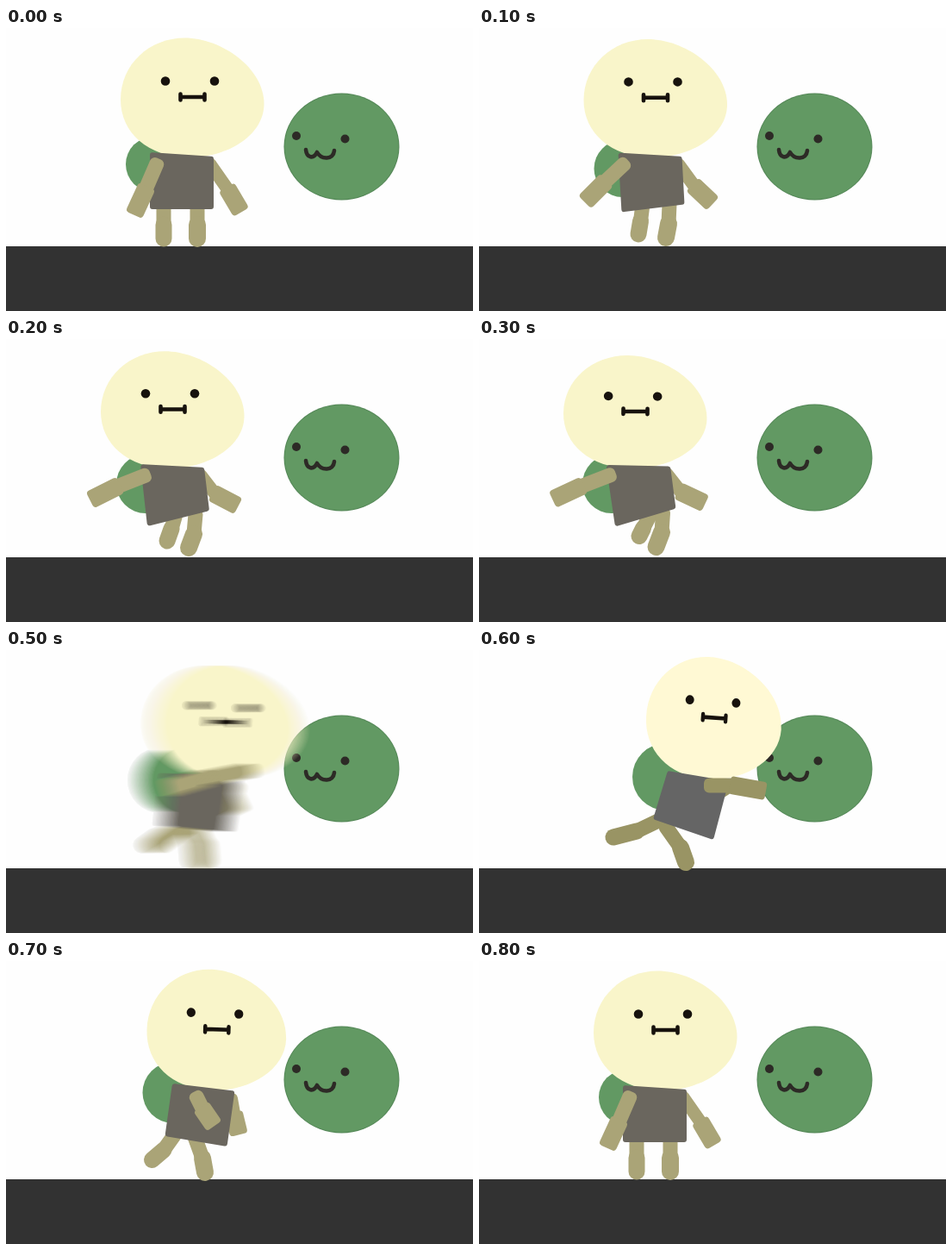
An HTML page with a canvas for the animation above (1.1 s loop, 542 px wide and 328 px high).

```html
<!DOCTYPE html>
<html>
<head>
<meta charset="utf-8">
<style>
html, body { margin: 0; width: 100%; height: 100%; overflow: hidden; background: #fefefe; }
canvas { display: block; }
</style>
</head>
<body>
<canvas id="stage" width="542" height="328"></canvas>
<script>
const W = 542, H = 328;
const screen = document.getElementById('stage').getContext('2d');
const layer = document.createElement('canvas');
layer.width = W;
layer.height = H;
const ctx = layer.getContext('2d');

const SOFT = { skin: '#f9f5ca', cloth: '#6a665e', limb: '#aaa477' };
const VIVID = { skin: '#fff9d4', cloth: '#656565', limb: '#999464' };
const GREEN = '#629963', INK = '#2d2a26';

// head: x, height scale, width scale, tilt; tail: x, y, radius;
// body: four corners; limbs: joints from the trunk outwards
const stand = {
  head: [216.5, 1, 1, 0], tail: [171, 158, 32],
  body: [167, 144, 241, 149, 241, 210, 167, 210],
  front: [175, 157, 162, 187, 150, 213], back: [258, 188, 271, 210],
  legL: [183, 205, 183, 228, 183, 244], legR: [222, 205, 222, 228, 222, 244]
};
const lean = {
  head: [193.5, .98, 1, 0], tail: [162, 168, 34],
  body: [156, 145, 230, 149, 236, 199, 164, 217],
  front: [162, 158, 129, 171, 101, 185], back: [243, 180, 266, 192],
  legL: [197, 203, 192, 220, 187, 234], legR: [220, 203, 218, 226, 212, 242]
};
const windUp = {
  head: [169.5, .91, 1, 1], tail: [146, 168, 34],
  body: [139, 147, 214, 146, 221, 194, 152, 218],
  front: [144, 157, 107, 171, 77, 184], back: [226, 175, 252, 186],
  legL: [200, 205, 189, 219, 185, 223], legR: [207, 200, 206, 222, 199, 240]
};
const strike = {
  head: [273, 1.02, .945, 4], tail: [217, 147, 39],
  body: [219, 140, 290, 152, 272, 220, 202, 196],
  front: [267, 157, 295, 157, 329, 163], back: [272, 170, 268, 185],
  legL: [208, 198, 183, 210, 156, 217], legR: [217, 205, 234, 229, 240, 246]
};

function mix(a, b, t) {
  const pose = {};
  for (const part in a) pose[part] = a[part].map((v, i) => v + (b[part][i] - v) * t);
  return pose;
}

const swing = {
  ...mix(windUp, strike, .65),
  head: [255, .95, 1, 3], tail: [194, 151, 38],
  front: [279, 140, 230, 149, 190, 160],
  legL: [203, 206, 186, 216, 172, 226]
};
const steps = [
  stand, mix(stand, lean, .5), lean, mix(lean, windUp, .5), windUp,
  swing, strike, mix(strike, stand, .5), stand, stand, stand
];

function oval(x, y, rx, ry, color) {
  ctx.fillStyle = color;
  ctx.beginPath();
  ctx.ellipse(x, y, rx, ry, 0, 0, 7);
  ctx.fill();
}

function line(d, width, color) {
  ctx.strokeStyle = color;
  ctx.lineWidth = width;
  ctx.stroke(new Path2D(d));
}

function bar(x1, y1, x2, y2, width, radius) {
  ctx.save();
  ctx.translate(x1, y1);
  ctx.rotate(Math.atan2(y2 - y1, x2 - x1));
  ctx.beginPath();
  ctx.roundRect(-radius, -width / 2, Math.hypot(x2 - x1, y2 - y1) + 2 * radius, width, radius);
  ctx.fill();
  ctx.restore();
}

function limb([x1, y1, x2, y2, x3, y3], color, upper, lower, radius) {
  ctx.fillStyle = color;
  bar(x1, y1, x2, y2, upper, 6);
  bar(x2, y2, x3, y3, lower, radius);
}

function drawHead([x, tall, wide, tilt], color) {
  ctx.save();
  ctx.translate(x, 150.5 - 69.5 * tall);
  ctx.rotate(tilt * Math.PI / 180);
  ctx.scale(wide, tall);
  ctx.fillStyle = color;
  ctx.fill(new Path2D('M-9 -69.5C33 -69.5 83 -35 83 7C83 43 41 69 -4 69C-52 69 -83.5 40 -83.5 2C-83.5 -39 -50 -69.5 -9 -69.5Z'));
  oval(-31.5, -19.5, 5.3, 5.3, '#17120d');
  oval(25.5, -19.5, 5.3, 5.3, '#17120d');
  line('M-14 -1H14M-14 -4.5V2.5M14 -4.5V2.5', 4.6, '#17120d');
  ctx.restore();
}

function drawBody([x1, y1, x2, y2, x3, y3, x4, y4], color) {
  ctx.fillStyle = color;
  ctx.beginPath();
  ctx.moveTo((x1 + x2) / 2, (y1 + y2) / 2);
  ctx.arcTo(x2, y2, x3, y3, 3);
  ctx.arcTo(x3, y3, x4, y4, 3);
  ctx.arcTo(x4, y4, x1, y1, 3);
  ctx.arcTo(x1, y1, x2, y2, 3);
  ctx.fill();
}

function drawScene(pose, colors, dx) {
  ctx.fillStyle = '#fefefe';
  ctx.fillRect(0, 0, W, H);
  ctx.fillStyle = '#323232';
  ctx.fillRect(0, 253, W, H);
  ctx.lineCap = ctx.lineJoin = 'round';

  oval(389.5, 137.5, 67, 62, '#548757');
  oval(389.5, 137.5, 66, 61, GREEN);
  oval(337, 125, 5, 5, INK);
  oval(393.5, 128.5, 5, 5, INK);
  line('M348 141C349 151 357 152 361 144C366 153 380 153 381 142', 4.6, INK);

  ctx.save();
  ctx.translate(dx, 0);
  const [x, y, r] = pose.tail;
  const shoulder = [pose.body[2] - 4, pose.body[3] + 9];
  oval(x, y, r, r, GREEN);
  drawHead(pose.head, colors.skin);
  limb([...shoulder, ...pose.back], colors.limb, 15, 21, 4);
  limb(pose.legL, colors.limb, 17, 19, 9.5);
  limb(pose.legR, colors.limb, 17, 20, 10);
  drawBody(pose.body, colors.cloth);
  limb(pose.front, colors.limb, 17, 21, 4);
  ctx.restore();
}

let shown = -1;
function frame() {
  const step = Math.floor(performance.now() % 1100 / 100);
  if (step !== shown) {
    shown = step;
    const pose = steps[step];
    const colors = pose === strike ? VIVID : SOFT;
    // the fast swing is averaged over its travel
    const samples = pose === swing ? 25 : 1;
    for (let i = 0; i < samples; i++) {
      drawScene(pose, colors, samples > 1 ? (i / (samples - 1) - .5) * 30 : 0);
      screen.globalAlpha = 1 / (i + 1);
      screen.drawImage(layer, 0, 0);
    }
  }
  requestAnimationFrame(frame);
}
frame();
</script>
</body>
</html>
```
